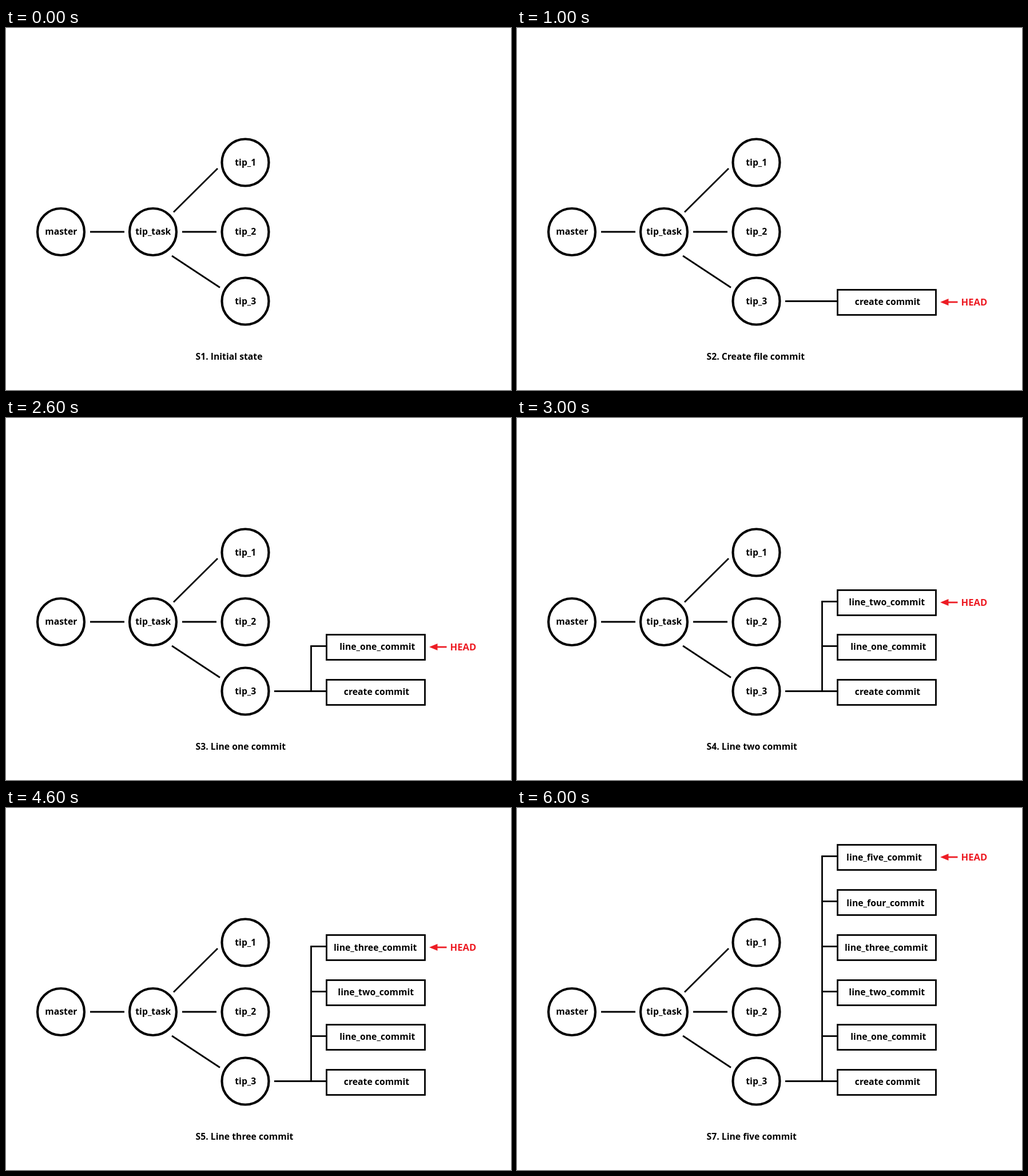
Animation, 883 px wide and 634 px high, one loop 7000 ms. Source, as an HTML page with a canvas:

```html
<!DOCTYPE html>
<html lang="en">
<head>
<meta charset="utf-8">
<title>Branch and commit steps</title>
<style>
  html, body { margin: 0; width: 100%; height: 100%; overflow: hidden; background: #fff; }
  canvas { display: block; }
</style>
</head>
<body>
<canvas id="stage" width="883" height="634"></canvas>
<script>
const ctx = document.getElementById('stage').getContext('2d');
const STEP_MS = 1000;
const BLACK = '#000';
const RED = '#ed1c24';

const captions = [
  'Initial state', 'Create file commit', 'Line one commit', 'Line two commit',
  'Line three commit', 'Line four commit', 'Line five commit'
];

// label, centre x, baseline
const commits = [
  ['create commit', 648, 484.5],
  ['line_one_commit', 649.3, 406],
  ['line_two_commit', 646.7, 327.5],
  ['line_three_commit', 645.7, 250],
  ['line_four_commit', 644.3, 171.5],
  ['line_five_commit', 642, 92]
];

// label, centre x, centre y
const branches = [
  ['master', 96, 357],
  ['tip_task', 257, 357],
  ['tip_1', 418.5, 235.5],
  ['tip_2', 418.5, 357],
  ['tip_3', 418.5, 478.5]
];

const links = [
  [147, 357, 207, 357],
  [308, 357, 368, 357],
  [293, 322.5, 370, 246],
  [290, 399, 374, 454.5]
];

const boxTop = i => Math.round(457 - 78.75 * i);
const linkY = i => boxTop(i) + 21.5;

function text(label, x, y, { size = 15.75, align = 'center', color = BLACK } = {}) {
  ctx.font = `700 ${size}px "Open Sans", "Noto Sans", sans-serif`;
  ctx.textAlign = align;
  ctx.fillStyle = color;
  ctx.fillText(label, x, y);
}

function line(x1, y1, x2, y2, color = BLACK) {
  ctx.strokeStyle = color;
  ctx.lineWidth = 2.8;
  ctx.beginPath();
  ctx.moveTo(x1, y1);
  ctx.lineTo(x2, y2);
  ctx.stroke();
}

function drawBranch([label, x, y]) {
  ctx.strokeStyle = BLACK;
  ctx.lineWidth = 4.2;
  ctx.beginPath();
  ctx.arc(x, y, 41, 0, Math.PI * 2);
  ctx.stroke();
  text(label, x + 0.3, y + 5);
}

function drawCommit([label, x, baseline], i) {
  ctx.strokeStyle = BLACK;
  ctx.lineWidth = 2.8;
  ctx.strokeRect(560.5, boxTop(i) + 1.5, 172, 44);
  line(i ? 532.1 : 469, linkY(i), 560, linkY(i));
  text(label, x, baseline);
}

function drawHead(i) {
  const y = boxTop(i) + 23;
  line(752, y, 770.5, y, RED);
  ctx.fillStyle = RED;
  ctx.beginPath();
  ctx.moveTo(740, y);
  ctx.lineTo(754.5, y - 6);
  ctx.lineTo(754.5, y + 6);
  ctx.fill();
  text('HEAD', 799.4, y + 5.7, { size: 16.6, color: RED });
}

function draw(step) {
  ctx.fillStyle = '#fff';
  ctx.fillRect(0, 0, 883, 634);
  links.forEach(link => line(...link));
  branches.forEach(drawBranch);
  commits.slice(0, step).forEach(drawCommit);
  if (step > 1) line(533.5, linkY(0), 533.5, linkY(step - 1));
  if (step > 0) drawHead(step - 1);
  text(`S${step + 1}. ${captions[step]}`, 331.5, 581, { align: 'left' });
}

const start = performance.now();
function tick() {
  draw(Math.floor((performance.now() - start) / STEP_MS) % captions.length);
  requestAnimationFrame(tick);
}
tick();
</script>
</body>
</html>
```
